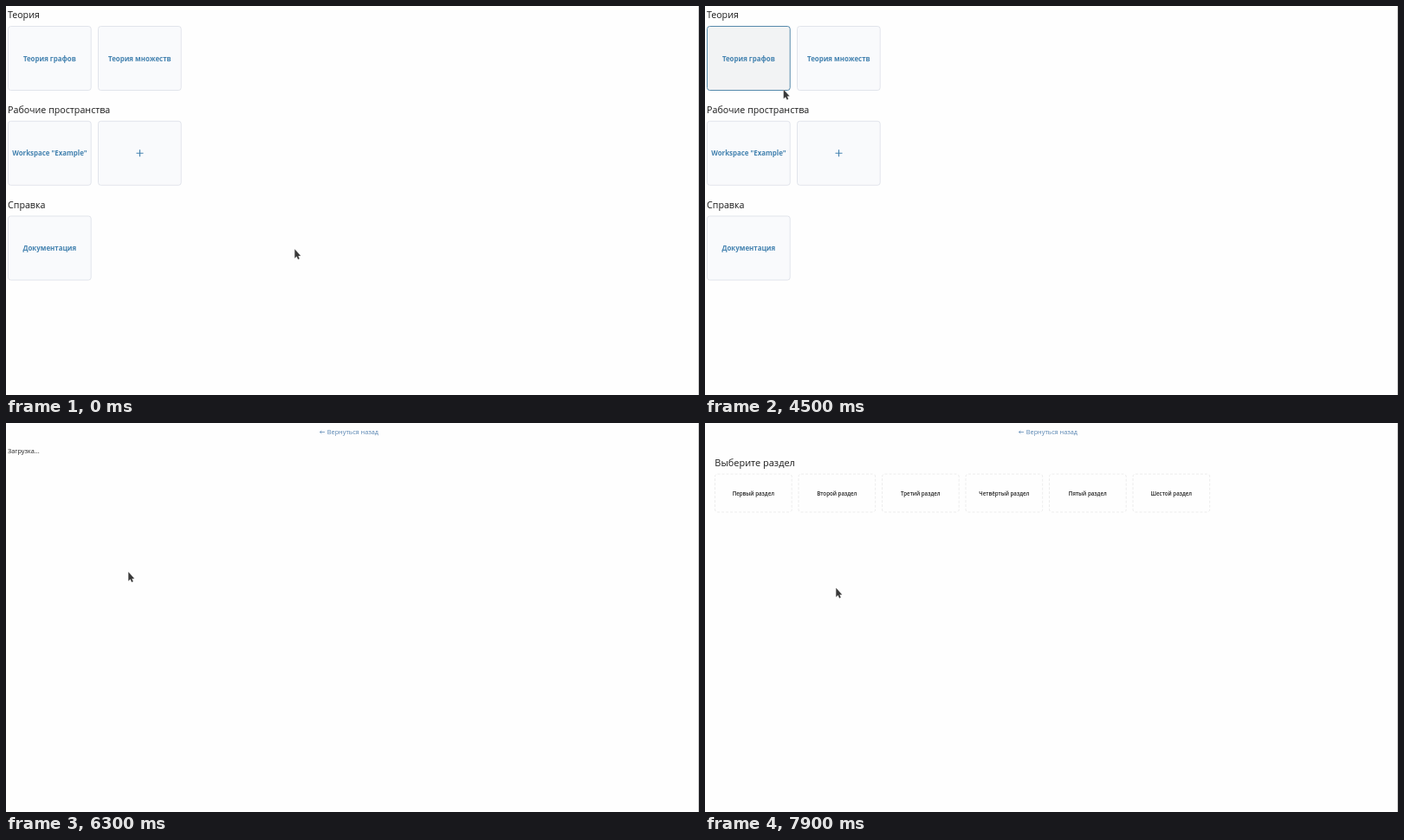
Recreate the animation shown at these times as an HTML page. Size 800x450 px, loop 8000 ms.

```html
<!DOCTYPE html>
<html lang="ru">
<head>
<meta charset="utf-8">
<style>
html, body { margin: 0; width: 100%; height: 100%; overflow: hidden; background: #fefefe; }
svg { display: block; width: 100vw; height: 100vh; font-family: "Open Sans", "Noto Sans", sans-serif; }
.head { font-size: 10.7px; fill: #1c1c1c; }
#list .head { font-size: 10.95px; font-weight: 500; }
.tile rect { fill: #f9fafc; stroke: #e1e4eb; }
.tile.hover rect { fill: #f2f3f4; stroke: #5589ab; }
.tile text { font-size: 7.9px; font-weight: 700; fill: #4583b0; text-anchor: middle; }
.tile path { stroke: #4583b0; stroke-width: 1.1; }
.section rect { fill: none; stroke: #ececec; stroke-dasharray: 3 2; }
.section text { font-size: 6.2px; font-weight: 600; fill: #222; text-anchor: middle; }
.link { font-size: 7.3px; fill: #5482b0; text-anchor: end; }
.wait { font-size: 7.3px; fill: #222; }
</style>
</head>
<body>
<svg viewBox="0 0 800 450">
  <path d="M799.5 0V450" stroke="#c9c9c9"/>
  <g id="home"></g>
  <g id="back">
    <path d="M368 10.5H362.5M364.3 8.8L362.5 10.5L364.3 12.2" fill="none" stroke="#5482b0" stroke-width=".7"/>
    <text class="link" x="430" y="13">Вернуться назад</text>
  </g>
  <text id="wait" class="wait" x="2" y="34.7">Загрузка...</text>
  <g id="list"></g>
  <path id="cursor" d="M.4 .6V10.6L2.6 8.6L4.2 12L5.6 11.3L4.2 7.9H7Z" fill="#383838" stroke="#bbb" stroke-width=".8" paint-order="stroke"/>
</svg>
<script>
const $ = id => document.getElementById(id);
const home = $('home'), list = $('list');
const W = 95.7, H = 74;

const heading = (x, y, text) => `<text class="head" x="${x}" y="${y}">${text}</text>`;

function tile(label, col, row) {
  const x = 2.5 + 104 * col, y = 23.5 + 109.75 * row;
  const face = label === '+' ? `<path d="M${x + 44} ${y + 37}h8m-4-4v8"/>`
    : `<text x="${x + W / 2}" y="${y + 40}">${label}</text>`;
  return `<g class="tile"><rect x="${x}" y="${y}" width="${W}" height="${H}" rx="3"/>${face}</g>`;
}

home.innerHTML = [
  ['Теория', 'Теория графов', 'Теория множеств'],
  ['Рабочие пространства', 'Workspace "Example"', '+'],
  ['Справка', 'Документация']
].map(([title, ...labels], row) => heading(2, 14.3 + 109.75 * row, title) +
  labels.map((label, col) => tile(label, col, row)).join('')).join('');

list.innerHTML = heading(11.3, 49.5, 'Выберите раздел') +
  ['Первый', 'Второй', 'Третий', 'Четвёртый', 'Пятый', 'Шестой'].map((name, i) => {
    const x = 11.5 + 96.5 * i;
    return `<g class="section"><rect x="${x}" y="59" width="88.7" height="44" rx="3"/>` +
      `<text x="${x + 44.3}" y="83.5">${name} раздел</text></g>`;
  }).join('');

const tiles = [...home.querySelectorAll('.tile')];

// Cursor moves: start, end, x, y reached; each one slows down towards its end
const moves = [
  [4000, 4100, 254, 199], [4100, 4700, 70, 83.5],
  [5700, 6300, 141, 172], [6400, 6900, 151, 190.5]
];

function tip(t) {
  let x = 333, y = 281;
  for (const [start, end, toX, toY] of moves) {
    const left = 1 - Math.min(1, Math.max(0, (t - start) / (end - start)));
    const k = 1 - left * left;
    x += (toX - x) * k;
    y += (toY - y) * k;
  }
  return [x, y];
}

const show = (node, on) => node.style.display = on ? '' : 'none';

function draw(now) {
  const t = Math.floor(now % 8000 / 100) * 100;
  const [x, y] = tip(t);
  show(home, t < 5200);
  show($('back'), t >= 5200);
  show($('wait'), t >= 5200 && t < 7200);
  show(list, t >= 7200);
  for (const node of tiles) {
    const box = node.firstChild.getBBox();
    node.classList.toggle('hover', x >= box.x && x <= box.x + W && y >= box.y && y <= box.y + H);
  }
  $('cursor').setAttribute('transform', `translate(${x} ${y})`);
  requestAnimationFrame(draw);
}
draw(performance.now());
</script>
</body>
</html>
```
